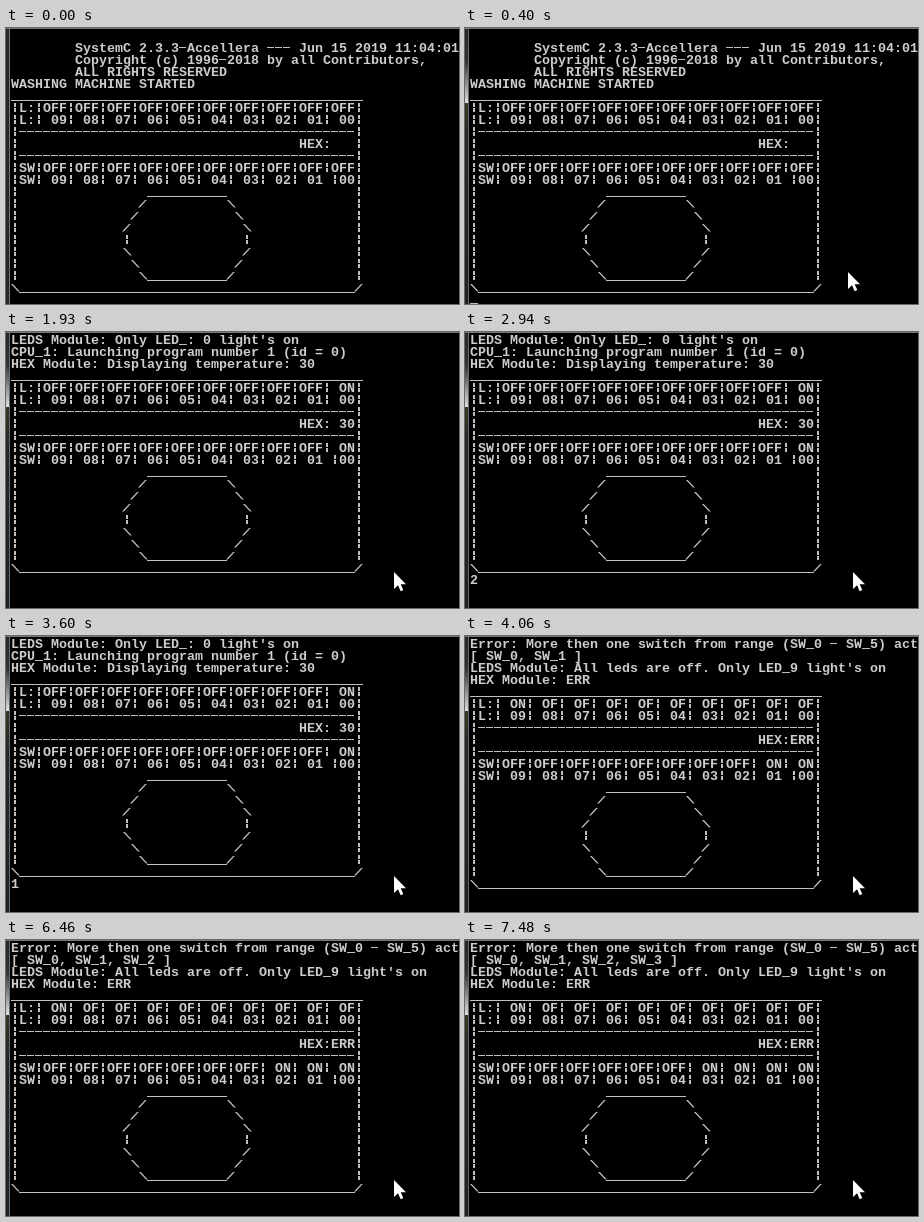
Write an HTML page that moves like this. It is 453 px wide and 276 px high and loops after 8000 ms.

```html
<!DOCTYPE html>
<html lang="en">
<head>
<meta charset="utf-8">
<title>Washing machine console</title>
<style>
  html, body { margin: 0; width: 100%; height: 100%; overflow: hidden; background: #000; }
  svg { display: block; width: 453px; height: 276px; }
  text { font: bold 13.333px "Liberation Mono", "DejaVu Sans Mono", monospace; fill: #ccc; white-space: pre; }
</style>
</head>
<body>
<svg viewBox="0 0 453 276" xmlns="http://www.w3.org/2000/svg">
  <defs>
    <linearGradient id="glass" x1="0" y1="0" x2="0" y2="1">
      <stop offset="0" stop-color="#262626"/>
      <stop offset=".12" stop-color="#333"/>
      <stop offset=".27" stop-color="#ddd"/>
      <stop offset=".27" stop-color="#3a3a20"/>
      <stop offset=".4" stop-color="#262626"/>
      <stop offset="1" stop-color="#222"/>
    </linearGradient>
  </defs>
  <rect width="453" height="276"/>
  <rect id="edge" width="3" height="276"/>
  <rect id="rim" x="3" width="1" height="276"/>
  <rect width="453" height="1" fill="#777"/>
  <g id="screen"></g>
  <rect id="caret" width="8" height="3" fill="#c0c0c0"/>
  <path id="pointer" d="M0 0V17L4 13.3L6.7 19.2L9.3 18L6.7 12.3H12Z" fill="#fff"/>
</svg>
<script>
const LOOP = 8000, CELL = 8, LINE = 12, LEFT = 5, TOP = 2;
const $ = id => document.getElementById(id);

// Line-drawing characters as filled shapes inside one 8 x 12 cell
const shapes = {
  '_': (x, y) => `M${x} ${y + 10}h8v1h-8z`,
  '-': (x, y) => `M${x} ${y + 5}h7v1h-7z`,
  '¦': (x, y) => `M${x + 3} ${y + 1}h2v4h-2zM${x + 3} ${y + 6}h2v4h-2z`,
  '/': (x, y) => `M${x + 6} ${y + 2}h1.8l-7 7.5h-1.8z`,
  '\\': (x, y) => `M${x} ${y + 2}h1.8l7 7.5h-1.8z`
};

const escapeText = s => s.replace(/&/g, '&amp;').replace(/</g, '&lt;');

function renderLine(line, row) {
  const y = TOP + row * LINE;
  let path = '';
  const words = [...line].map((c, i) => {
    if (!shapes[c]) return c;
    path += shapes[c](LEFT + i * CELL, y);
    return ' ';
  }).join('');
  const text = words.trim()
    ? `<text x="${LEFT}" y="${y + 10}" xml:space="preserve">${escapeText(words)}</text>` : '';
  return text + `<path d="${path}" fill="#c0c0c0"/>`;
}

// leds and switches are listed from number 9 down to 0
function panel(leds, hex, switches) {
  const framed = s => '¦' + s.padEnd(42) + '¦';
  const cells = list => list.map(s => s.padStart(3)).join('¦');
  const sides = (col, a, b) => framed(' '.repeat(col - 1) + a + ' '.repeat(42 - 2 * col) + b);
  const numbers = cells([...Array(10).keys()].reverse().map(n => '0' + n));
  const rule = framed('-'.repeat(42));
  const bar = '_'.repeat(10);
  return [
    '_'.repeat(44),
    framed('L:¦' + cells(leds)),
    framed('L:¦' + numbers),
    rule,
    framed(' '.repeat(35) + 'HEX:' + hex),
    rule,
    framed('SW¦' + cells(switches)),
    framed('SW¦' + numbers.replace('01¦ 00', '01 ¦00')),
    framed(' '.repeat(16) + bar),
    sides(16, '/', '\\'),
    sides(15, '/', '\\'),
    sides(14, '/', '\\'),
    sides(14, '¦', '¦'),
    sides(14, '\\', '/'),
    sides(15, '\\', '/'),
    framed(' '.repeat(15) + '\\' + bar + '/'),
    '\\' + '_'.repeat(42) + '/'
  ];
}

const bank = (off, isOn) => Array.from({ length: 10 }, (_, i) => isOn(9 - i) ? 'ON' : off);

const started = [
  '',
  '        SystemC 2.3.3-Accellera --- Jun 15 2019 11:04:01',
  '        Copyright (c) 1996-2018 by all Contributors,',
  '        ALL RIGHTS RESERVED',
  'WASHING MACHINE STARTED',
  ...panel(bank('OFF', () => false), '', bank('OFF', () => false))
];

const running = [
  "LEDS Module: Only LED_: 0 light's on",
  'CPU_1: Launching program number 1 (id = 0)',
  'HEX Module: Displaying temperature: 30',
  ...panel(bank('OFF', n => n === 0), ' 30', bank('OFF', n => n === 0))
];

const failed = last => [
  'Error: More then one switch from range (SW_0 - SW_5) activated',
  `[ ${Array.from({ length: last + 1 }, (_, n) => 'SW_' + n).join(', ')} ]`,
  "LEDS Module: All leds are off. Only LED_9 light's on",
  'HEX Module: ERR',
  ...panel(bank('OF', n => n === 9), 'ERR', bank('OFF', n => n <= last))
];

const screens = [[0, started], [1930, running], [4060, failed(1)], [6460, failed(2)], [7480, failed(3)]];

// [time, typed text, caret shown]
const input = [
  [0, '', false], [400, '', true], [910, '', false],
  [1270, '0', false], [1400, '0', true], [1880, '0', false], [1930, '', false],
  [2480, '', true], [2940, '2', false], [3000, '2', true], [3400, '', true],
  [3550, '1', false], [4060, '', false],
  [5110, '', true], [5620, '', false], [6130, '', true], [6190, '2', false],
  [6460, '', false], [7200, '', true], [7300, '3', false], [7480, '', false]
];

const FOCUS = 130, STEP = 55, STEPS = 7;
const latest = (list, t) => list.filter(item => item[0] <= t).pop();
let shown = '';

function update(t) {
  const [screenTime, lines] = latest(screens, t);
  const [, typed, blink] = latest(input, t);
  const key = screenTime + ':' + typed;
  if (key !== shown) {
    $('screen').innerHTML = [...lines, typed].map(renderLine).join('');
    shown = key;
  }

  const caret = $('caret');
  caret.setAttribute('x', LEFT + typed.length * CELL);
  caret.setAttribute('y', TOP + lines.length * LINE + 9);
  caret.style.display = blink ? '' : 'none';

  const focused = t >= FOCUS;
  const step = Math.min(STEPS, Math.floor((t - FOCUS) / STEP) + 1);
  const p = 1 - (1 - step / STEPS) ** 2;
  const pointer = $('pointer');
  pointer.style.display = focused ? '' : 'none';
  pointer.setAttribute('transform', `translate(${Math.round(330 + 58 * p)} ${Math.round(290 - 50 * p)})`);
  $('edge').setAttribute('fill', focused ? 'url(#glass)' : '#262626');
  $('rim').setAttribute('fill', focused ? '#5c6c78' : '#777');
}

function tick(now) {
  update(now % LOOP);
  requestAnimationFrame(tick);
}
update(0);
requestAnimationFrame(tick);
</script>
</body>
</html>
```
